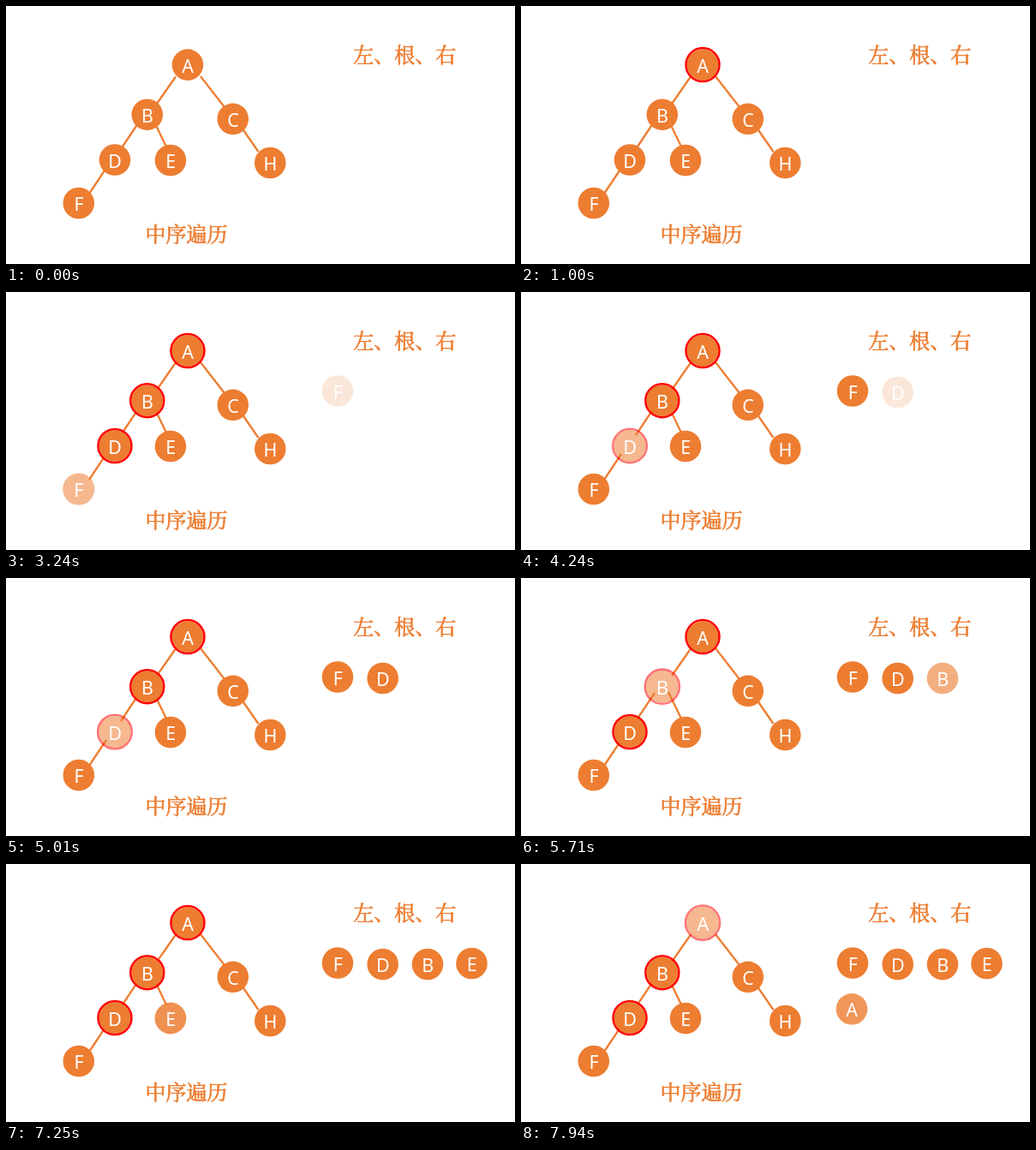
These frames come from a looping animation (594 by 301 pixels, 8 s). An HTML page:

```html
<!DOCTYPE html>
<html lang="zh">
<head>
<meta charset="utf-8">
<title>中序遍历</title>
<style>
html, body { margin: 0; width: 100%; height: 100%; overflow: hidden; background: #fff; }
svg { display: block; width: 594px; height: 301px; }
.edge { stroke: #ed7d31; stroke-width: 2.3; }
.dot { fill: #ed7d31; }
.ring { fill: none; stroke: #f00; stroke-width: 2.5; }
.letter { fill: #fff; font: 21.5px "Noto Sans", "Open Sans", sans-serif; text-anchor: middle; }
.label {
  fill: #ed7d31; stroke: #ed7d31; stroke-width: 0.7;
  font: 24px SimSun, "Noto Serif CJK SC", "Noto Sans CJK SC", serif;
}
</style>
</head>
<body>
<svg viewBox="0 0 594 301">
  <g id="edges"></g>
  <g id="nodes"></g>
  <text class="label" x="405.3" y="65.5">左、根、右</text>
  <text class="label" x="162.5" y="275">中序遍历</text>
</svg>
<script>
const LOOP = 8000;
const edges = [
  [198, 82.5, 176, 114], [227, 82, 255, 118], [156, 134, 134, 167],
  [172, 133, 187, 164], [276.5, 144, 294.5, 170], [117, 189, 97, 219]
];
const tree = {
  A: [212, 68.6], B: [164.8, 126.7], C: [264.8, 131.8], D: [127, 179.5],
  E: [192, 180], H: [308.3, 183], F: [84.8, 230]
};
const rings = { A: 40, B: 1040, D: 2090 };
// letter, start, pulse length, fade-in length, list position
const visits = [
  ['F', 3080, 1000, 920, 387, 115.5],
  ['D', 4080, 1140, 920, 439.7, 117],
  ['B', 5220, 1150, 800, 492, 117],
  ['E', 6360, 960, 570, 543.5, 116],
  ['A', 7330, 1000, 760, 386, 169.3]
];

const clamp = v => Math.max(0, Math.min(1, v));
const byId = id => document.getElementById(id);

function add(parent, tag, attrs, text = '') {
  const el = document.createElementNS('http://www.w3.org/2000/svg', tag);
  for (const k in attrs) el.setAttribute(k, attrs[k]);
  el.textContent = text;
  return parent.appendChild(el);
}

function addNode(letter, x, y) {
  const g = add(byId('nodes'), 'g', { transform: `translate(${x} ${y})` });
  add(g, 'circle', { class: 'dot', r: 18.3 });
  const ring = letter in rings && add(g, 'circle', { class: 'ring', r: 19.5, opacity: 0 });
  add(g, 'text', { class: 'letter', x: 0.2, y: 9 }, letter);
  return { g, ring, x, y };
}

for (const [x1, y1, x2, y2] of edges) add(byId('edges'), 'line', { class: 'edge', x1, y1, x2, y2 });
const nodes = {};
for (const k in tree) nodes[k] = addNode(k, ...tree[k]);
const list = visits.map(([k, , , , x, y]) => addNode(k, x, y));

function draw(t) {
  for (const k in rings) nodes[k].ring.setAttribute('opacity', clamp((t - rings[k]) / 960));
  visits.forEach(([k, start, length, fade], i) => {
    const dt = t - start;
    const { g, x, y } = nodes[k];
    // quick dip to half opacity, hold, then recover, with a slight swell
    const dip = clamp(Math.min(dt / 160, (length - dt) / 200));
    const scale = 1 + 0.03 * Math.sin(Math.PI * clamp(dt / length));
    g.setAttribute('opacity', 1 - 0.46 * dip);
    g.setAttribute('transform', `translate(${x} ${y}) scale(${scale})`);
    list[i].g.setAttribute('opacity', clamp(dt / fade));
  });
}

const begin = performance.now();
function tick() {
  draw((performance.now() - begin) % LOOP);
  requestAnimationFrame(tick);
}
tick();
</script>
</body>
</html>
```
